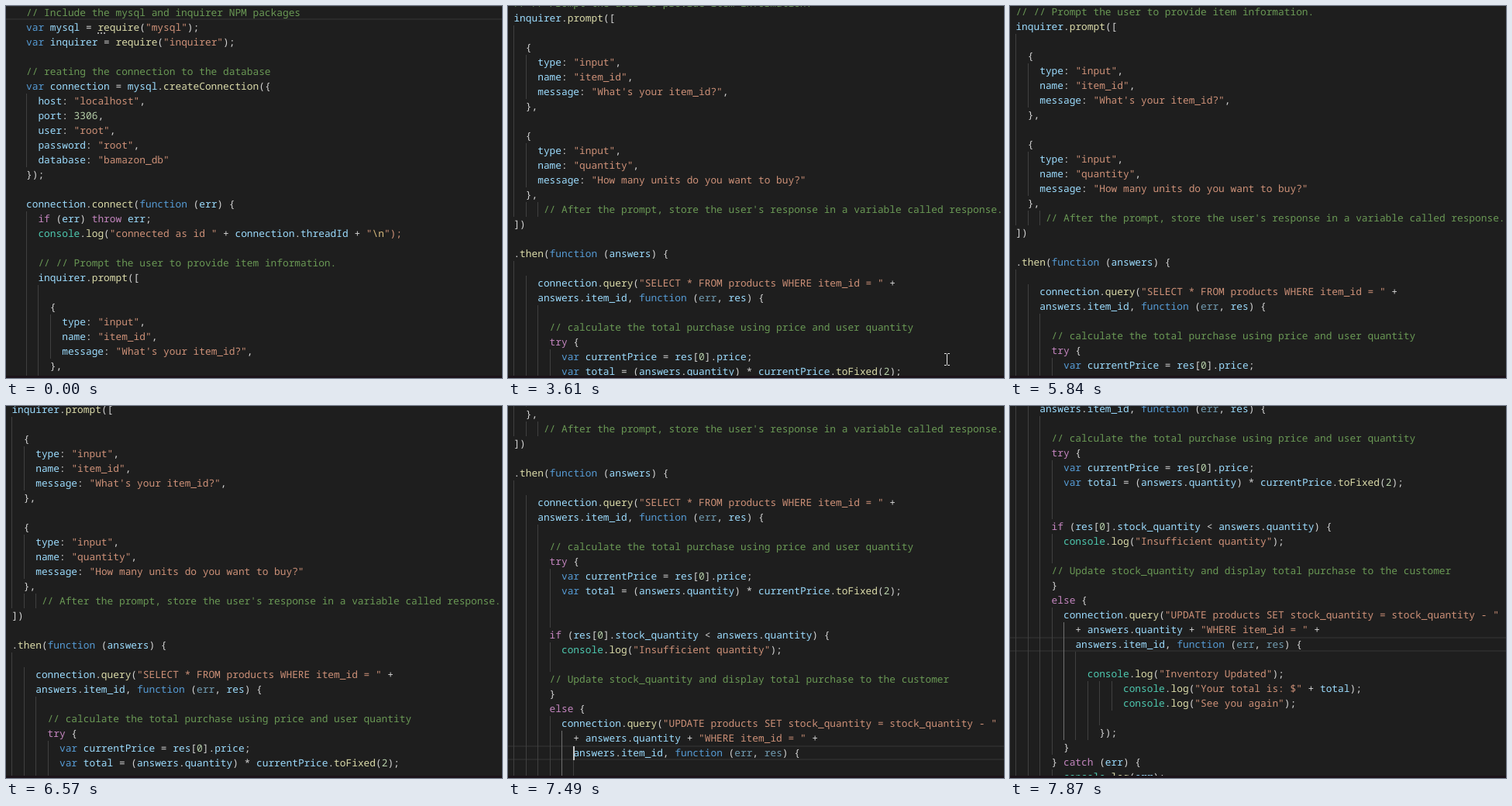
Animation, 640 px wide and 480 px high, one loop 8 s. Source, as an HTML page:

```html
<!DOCTYPE html>
<html>
<head>
<meta charset="utf-8">
<style>
html, body { margin: 0; width: 100%; height: 100%; overflow: hidden; background: #1e1e1e; }
#stage { position: relative; width: 640px; height: 480px; overflow: hidden; background: #1e1e1e; }
#stage * { position: absolute; }
#code { left: 0; top: 0; color: #d4d4d4; font: 12.83px/19px "Noto Sans Mono", monospace; text-rendering: geometricPrecision; font-variant-ligatures: none; }
#code pre { margin: 0; font: inherit; white-space: pre; }
#code pre span { position: static; }
.guide { width: 1px; height: 19px; background: #404040; }
.active { background: #707070; }
.comment { color: #6a9955; }
.string { color: #ce9178; }
.escape { color: #d7ba7d; }
.keyword { color: #569cd6; }
.control { color: #c586c0; }
.object { color: #4ec9b0; }
.number { color: #b5cea8; }
.call { color: #dcdcaa; }
.name { color: #9cdcfe; }
.unused { color: #729db3; }
#line { left: 0; width: 640px; height: 19px; box-sizing: border-box; border: solid #2a2a2a; border-width: 2px 0; }
#caret { width: 2px; height: 18px; background: #c8c8c8; }
#hint { width: 10px; border-bottom: 2px dotted #a0a0a0; }
#edge { left: 0; top: 477px; width: 640px; height: 3px; background: #1b1319; }
#mouse { left: 0; top: 0; fill: none; }
</style>
</head>
<body>
<div id="stage">
  <div id="line"></div>
  <div id="code"><div id="hint"></div><div id="caret"></div></div>
  <div id="edge"></div>
  <svg id="mouse" width="9" height="18">
    <path id="beam" d="M1 1.5h2.5l1 1 1-1H8M4.5 2.5v13M1 16.5h2.5l1-1 1 1H8" stroke="#e8e8e8"/>
  </svg>
</div>
<script>
const source = String.raw`// Include the mysql and inquirer NPM packages
var mysql = require("mysql");
var inquirer = require("inquirer");

// reating the connection to the database
var connection = mysql.createConnection({
  host: "localhost",
  port: 3306,
  user: "root",
  password: "root",
  database: "bamazon_db"
});

connection.connect(function (err) {
  if (err) throw err;
  console.log("connected as id " + connection.threadId + "\n");

  // // Prompt the user to provide item information.
  inquirer.prompt([

    {
      type: "input",
      name: "item_id",
      message: "What's your item_id?",
    },

    {
      type: "input",
      name: "quantity",
      message: "How many units do you want to buy?"
    },
       // After the prompt, store the user's response in a variable called response.
  ])

  .then(function (answers) {

      connection.query("SELECT * FROM products WHERE item_id = " +
      answers.item_id, function (~err, res) {

        // calculate the total purchase using price and user quantity
        try {
          var currentPrice = res[0].price;
          var total = (answers.quantity) * currentPrice.toFixed(2);


        if (res[0].stock_quantity < answers.quantity) {
          console.log("Insufficient quantity");

        // Update stock_quantity and display total purchase to the customer
        }
        else {
          connection.query("UPDATE products SET stock_quantity = stock_quantity - "
            + answers.quantity + "WHERE item_id = " +
            answers.item_id, function (~err, ~res) {

              console.log("Inventory Updated");
                    console.log("Your total is: $" + total);
                    console.log("See you again");

                });
          }
        } catch (err) {
          console.log(err);`;

const CHAR = 7.698, ROW = 19, TOP = -1, ACTIVE_ROW = 53;
const $ = id => document.getElementById(id);
const code = $("code"), lines = source.split("\n");
const token = /(?<comment>\/\/.*)|(?<escape>\\n)|(?<string>"[^"\\]*"?)|(?<keyword>\b(?:var|function)\b)|(?<control>\b(?:if|else|try|catch|throw)\b)|(?<object>\bconsole\b)|(?<number>\b\d+)|~(?<unused>\w+)|(?<call>\w+(?=\())|(?<name>\w+)/g;

const indentOf = line => line.search(/\S/);

// Blank rows borrow their guides from the nearest rows with text.
function guideCount(row) {
  if (lines[row]) return Math.ceil(indentOf(lines[row]) / 2);
  let a = row, b = row;
  while (!lines[a]) a--;
  while (!lines[b]) b++;
  const above = indentOf(lines[a]), below = indentOf(lines[b]);
  return above === below ? Math.ceil(below / 2) : 1 + Math.floor(Math.min(above, below) / 2);
}

function place(el, col, y) {
  el.style.left = col * CHAR + "px";
  el.style.top = y + "px";
}

lines.forEach((line, row) => {
  for (let g = 0; g < guideCount(row); g++) {
    const guide = document.createElement("div");
    const active = g === 5 && row >= 52 && row <= 59;
    guide.className = active ? "guide active" : "guide";
    place(guide, g * 2, row * ROW);
    code.append(guide);
  }
  const pre = document.createElement("pre");
  let end = 0;
  for (const match of line.matchAll(token)) {
    const [kind, text] = Object.entries(match.groups).find(entry => entry[1]);
    const span = document.createElement("span");
    span.className = kind;
    span.textContent = text;
    pre.append(line.slice(end, match.index), span);
    end = match.index + match[0].length;
  }
  pre.append(line.slice(end));
  place(pre, 0, row * ROW);
  code.append(pre);
});
place($("hint"), 12, ROW + 16);
place($("caret"), 12, ACTIVE_ROW * ROW + 1);

// [time, scroll offset]
const scrolls = [
  [0, 0], [990, 335],
  [5840, 324], [5920, 317], [6000, 313],
  [6470, 325], [6570, 346], [6630, 368], [6710, 396], [6790, 425], [6860, 452],
  [6940, 480], [7020, 507], [7090, 524],
  [7410, 544], [7490, 568], [7570, 598], [7640, 626], [7710, 654], [7790, 683], [7870, 708]
];

function draw(now) {
  const t = now % 8000;
  const scroll = scrolls.findLast(step => step[0] <= t)[1];
  const moved = t >= 990;
  code.style.transform = `translate(${moved ? -8 : 26}px, ${TOP - scroll}px)`;
  $("line").style.top = (moved ? ACTIVE_ROW : 0) * ROW + TOP - scroll + "px";
  $("caret").style.display = t < 7700 ? "" : "none";
  const mouse = $("mouse").style;
  mouse.display = t >= 3610 && t < 3760 ? "" : "none";
  mouse.transform = t < 3680 ? "translate(562px, 447px)" : "translate(611px, 405px)";
}

const start = performance.now();
(function loop() {
  draw(performance.now() - start);
  requestAnimationFrame(loop);
})();
</script>
</body>
</html>
```
